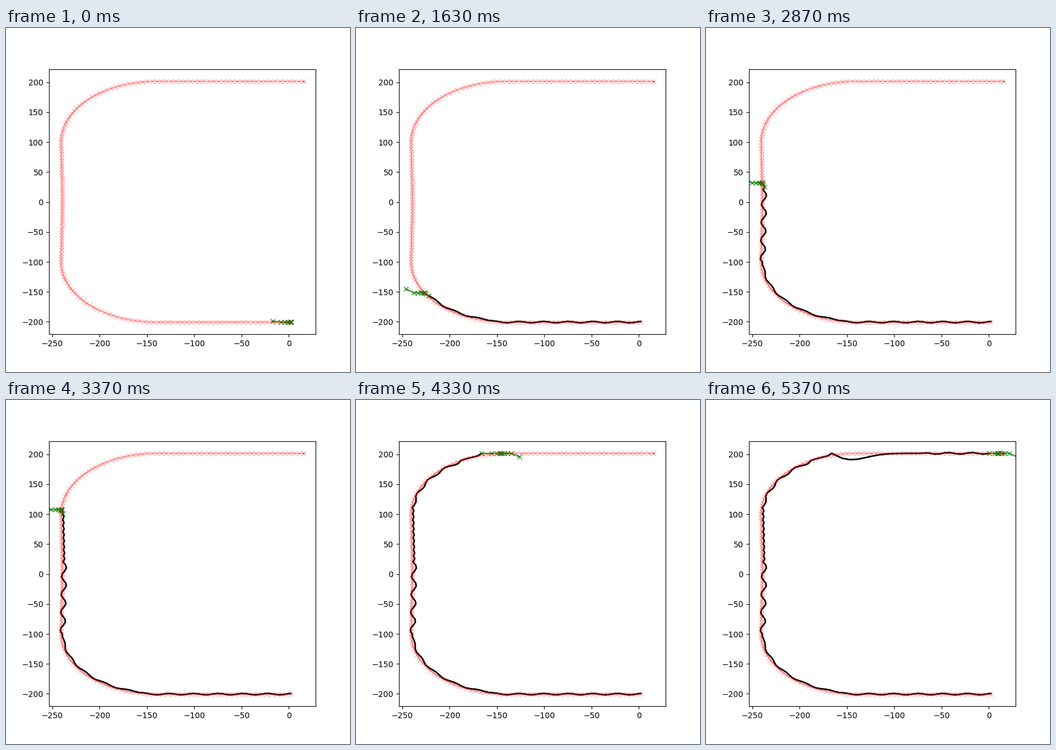
A matplotlib script that plays this animation: 600 px wide and 600 px high, repeating every 5.41 s.

```python
import numpy as np
import matplotlib.pyplot as plt
from matplotlib.animation import FuncAnimation

LOOP_MS = 5410
STEPS = 162
DRAWS = 2 * STEPS
SPEED = 5.03   # reference distance per step
STALL = 634    # distance at which the vehicle gets stuck for a while
FLIP = 128     # step at which the planned tail turns around


def reference():
    """Bottom straight, quarter turn, slightly bowed column, quarter turn, top straight."""
    q = np.linspace(0, np.pi / 2, 80)
    arc_x, arc_y = 100 * np.sin(q), 100 * np.cos(q)
    x = np.r_[2, -140.6 - arc_x, -239.2, -140.6 - arc_y, 15.4]
    y = np.r_[-200.5, -100.5 - arc_y, 0, 101.7 + arc_x, 201.7]
    s = np.r_[0, np.cumsum(np.hypot(np.diff(x), np.diff(y)))]
    return s, x, y


ref_s, ref_x, ref_y = reference()


def on_path(s):
    return np.interp(s, ref_s, ref_x), np.interp(s, ref_s, ref_y)


def inward(s):
    """Distance of the driven track from the reference, positive to the inside."""
    # Weave per stretch: start, mean, amplitude, period, a crest
    stretches = [
        (0, 0, 1.2, 26, 24.6),
        (155, 2, 1, 28, 201),
        (297, 1.7, 2.7, 30, 411.6),
        (421, 2.2, 0.6, 2 * SPEED, 425.6),
        (510, 1.8, 1.5, 27, 521),
        (605, 0, 0, 1, 0),
        (730, 0, 1.4, 25, 769),
    ]
    off = np.zeros_like(s)
    for start, mean, amp, period, crest in stretches:
        weave = mean + amp * np.cos(2 * np.pi * (s - crest) / period)
        off = np.where(s >= start, weave, off)
    u = np.maximum(s - STALL, 0) / 21
    swerve = 10.6 * u * np.exp((1 - u * u) / 2)
    spike = 3.2 * np.exp(-((s - STALL) / 3) ** 2)
    return off + swerve - spike


def driven():
    k = np.arange(STEPS)
    lag = np.interp(k, [0, 17, 30, 50, 110, 128, 138, 143, 150, 161],
                    [0, 13, 11, 7, 7, 10, 59, 43, 19, 10])
    s = SPEED * k - lag
    x, y = on_path(s)
    x0, y0 = on_path(s - 1)
    x1, y1 = on_path(s + 1)
    dx, dy = x1 - x0, y1 - y0
    off = inward(s) / np.hypot(dx, dy)
    return x + off * dy, y - off * dx


track_x, track_y = driven()

TAIL_X = np.array([1.5, 3.5, 6.5, 11, 19.5])
TAIL_Y = np.array([-0.6, 0.2, -0.4, 0, 6])


def plan(i):
    """Approach from the vehicle to its target, then a tail beyond it."""
    px, py = track_x[i], track_y[i]
    cx, cy = on_path(SPEED * i)
    gap = np.hypot(cx - px, cy - py)
    d, part = 0.0, [0.0]
    for _ in range(5):
        d += min(10, 0.6 * (gap - d))
        part.append(d / max(gap, 1e-9))
    part = np.array(part)
    side = -1 if i < FLIP else 1
    rise = min(1, 0.3 + 0.1 * i)
    return (np.r_[px + (cx - px) * part, cx + side * TAIL_X],
            np.r_[py + (cy - py) * part, cy - side * rise * TAIL_Y])


fig, ax = plt.subplots(figsize=(6, 6), dpi=100)

mark_x, mark_y = on_path(np.linspace(0, ref_s[-1], 164))
ax.plot(mark_x, mark_y, "r-", alpha=0.33, zorder=3)
ax.plot(mark_x, mark_y, "rx", alpha=0.28, zorder=3)
ax.plot(mark_x[-1], mark_y[-1], "o", color="navy", ms=1.5, mew=0)
ax.autoscale_view()
ax.autoscale(False)

track, = ax.plot([], [], "k-", lw=2)
ahead, = ax.plot([], [], "g-x", alpha=0.8)


def update(draw):
    i = min((draw + 1) // 2, STEPS - 1)
    track.set_data(track_x[:i + 1], track_y[:i + 1])
    ahead.set_data(*plan(i))
    return track, ahead


anim = FuncAnimation(fig, update, frames=DRAWS, interval=LOOP_MS / DRAWS,
                     repeat=True, repeat_delay=0, blit=False)
plt.show()
```
